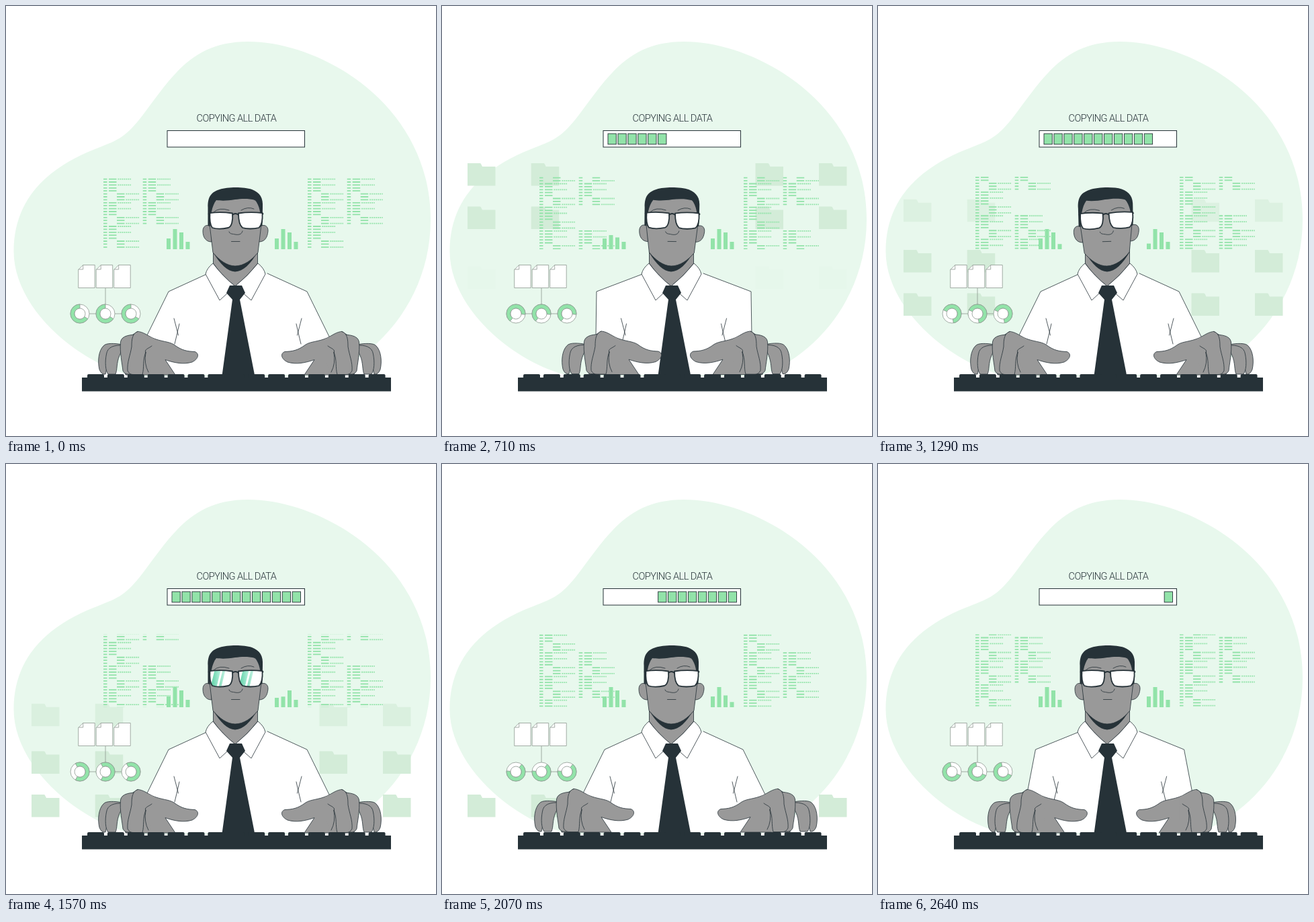
These frames come from a looping animation (640 by 640 pixels, 2710 ms). An HTML page:

```html
<!DOCTYPE html>
<html lang="en">
<head>
<meta charset="utf-8">
<title>Copying all data</title>
<style>
  html, body { margin: 0; width: 100%; height: 100%; overflow: hidden; background: #fff; }
  svg { display: block; width: 100vw; height: 100vh; }
  .ink { fill: #263238; }
  .line { fill: none; stroke: #263238; stroke-width: .8; stroke-linecap: round; stroke-linejoin: round; }
  .skin { fill: #999; stroke: #263238; stroke-width: .8; stroke-linejoin: round; }
  .cloth { fill: #fff; stroke: #263238; stroke-width: .8; stroke-linejoin: round; }
  .green { fill: #92e3a9; }
  .code { fill: none; stroke: #92e3a9; stroke-width: 1.8; }
  .dots { stroke-dasharray: 1.9 1.1; }
  .thin { fill: #fff; stroke: #8d9991; stroke-width: .8; }
  .block { fill: #92e3a9; stroke: #263238; stroke-width: .9; }
  .title { font-family: Roboto, "Open Sans", sans-serif; font-weight: 300; font-stretch: 75%;
    letter-spacing: -.04em; text-anchor: middle; fill: #263238; }
</style>
</head>
<body>
<svg viewBox="0 0 640 640">
  <defs>
    <clipPath id="screen"><rect x="140" y="253.5" width="430" height="108.5"/></clipPath>
    <path id="lensL" d="M303.5 308Q320 306 337 308.5C338 319 336 328 331 330C322 332 313 332 307 330C303 325 303 316 303.5 308Z"/>
    <path id="lensR" d="M346 308.5Q363 306 381.5 308C382 316 381 326 376.5 330C369 332 358 332 352 330C347 326 346 318 346 308.5Z"/>
    <clipPath id="lenses"><use href="#lensL"/><use href="#lensR"/></clipPath>
    <linearGradient id="sheen"><stop stop-color="#55cda0"/><stop offset="1" stop-color="#b9f2df"/></linearGradient>
    <g id="shine" fill="url(#sheen)">
      <path d="M322 305H331L324 334H315Z"/>
      <path d="M334 305H338L331 334H327Z" opacity=".75"/>
    </g>
    <path id="folder" fill="#d3ecd8" d="M0 0H18.5Q20 0 20.5 2L22 5H41.5V33.5H0Z"/>
    <g id="sleeve">
      <path class="sleeveFill" fill="#fff"/>
      <path class="sleeveLine line"/>
      <path class="fold line" d="M250 465L256.5 490M258 473Q255 487 251 503"/>
    </g>
    <g id="hand">
      <path class="skin" d="M174 504C162 502 149 501 145 506C138 513 136 528 139 541Q142 549 148 548L152 530L162 516Z"/>
      <path class="skin" d="M176 505C160 504 151 508 149.5 518C147 530 148 543 152 548H163C166 541 164 532 169 520Z"/>
      <path class="skin" d="M172 500L178 549H252L237 526.5C250 531 264 534 277 530C287 525 288 517 281 514.5C270 514 262 513 250 504C242 499 232 500 218 494C210 490 204 485 196 484.5Z"/>
      <path class="skin" d="M198 489C186 489 172 490 170.5 500C169 515 173 533 174 543Q177 549 184 548H192L200 510Z"/>
      <path fill="#999" d="M197 485C188 486 187 496 187 507C185 520 180 530 181 543Q184 549 190 548.5H206L222 530V496Z"/>
      <path class="line" d="M196 484.5C188 487 187 496 187 507C185 520 180 530 181 543Q184 549 190 548.5H203C206 538 203 528 208 515M208 516C205 511 212 510 217 506M208 516Q205 532 212 545"/>
    </g>
  </defs>

  <rect width="640" height="640" fill="#fff"/>
  <path fill="#e8f8ed" d="M360 53C472 53 632 149 632 318C632 430 560 520 470 552H200C118 540 11.5 455 11.5 365C11.5 285 65 240 130 214C165 200 175 198 200 167C245 108 275 53 360 53Z"/>
  <g id="folders"></g>
  <g clip-path="url(#screen)"><g id="code"></g></g>
  <g id="charts" class="green"></g>
  <path class="thin" d="M148 419.5V444M124 458H172"/>
  <g id="docs"></g>
  <g id="rings"></g>

  <text class="title" x="343" y="175" font-size="22.5">COPYING ALL DATA</text>
  <rect x="240" y="185.5" width="204.5" height="24.5" fill="#fff" stroke="#263238"/>
  <g id="bar"></g>

  <use href="#sleeve"/>
  <use href="#sleeve" transform="translate(690 0) scale(-1 1)"/>
  <path class="skin" d="M308.500 355V383Q322 402 341 417Q360 402 374.500 383V355Z"/>
  <path class="ink" d="M309 368C319 384 329 395 341 395.5C353 395 364 384 374 367V350H309Z"/>
  <path class="cloth" d="M308 383Q299 390 297 399L318 438L341 417Q322 402 308 383Z"/>
  <path class="cloth" d="M375 383Q384 390 386 399L365 438L341 417Q360 402 375 383Z"/>
  <path class="ink" d="M333 416H351L356 427L348 437L371 554H321L337 437L328 427Z"/>

  <g id="head">
    <path class="skin" d="M305 328C298 324 293 328 293 335C293 345 298 351 306 351Z"/>
    <path class="skin" d="M378 328C385 324 390.5 328 390 335C389 345 385 351 376 351Z"/>
    <path class="skin" d="M303 300V325L308 367C317 378 329 387 341 387C354 387 366 378 375 367L380 325V300Q370 280 340 280Q312 280 303 300Z"/>
    <path class="ink" d="M300.5 327V300C300 283 306 277 318 273C330 269 354 269 366 273C378 278 383 285 382 300L381.5 327L379 328C380 308 377 297 371 289C360 286 350 287 341 288C330 290 320 290 313 289C306 298 304.5 312 303.5 328Z"/>
    <path class="line" d="M309 307Q317 299 332 304M350 304Q360 298 369 302"/>
    <g fill="#fff"><use href="#lensL"/><use href="#lensR"/></g>
    <g clip-path="url(#lenses)"><g id="shines"><use href="#shine"/><use href="#shine" x="42"/></g></g>
    <g fill="none" stroke="#263238" stroke-width="1.8">
      <use href="#lensL"/><use href="#lensR"/>
      <path d="M337 311Q341.5 307 346 311M301 310L304 308M381 308L383 310"/>
    </g>
    <path class="line" d="M332 336C333 340 338 339 341 340C346 341 351 340 352 335M335.5 350.5H348"/>
  </g>

  <g class="arm"><use href="#hand"/></g>
  <g transform="translate(696 0) scale(-1 1)"><g class="arm"><use href="#hand"/></g></g>
  <g class="ink" id="keys"><path d="M113 553H573V573.5H113Z"/></g>
</svg>
<script>
const LOOP = 2710, STEP = 1000 / 14;
const $ = s => document.querySelector(s);
const $$ = s => [...document.querySelectorAll(s)];
const range = n => [...Array(n).keys()];
const clamp = v => Math.min(1, Math.max(0, v));
const cubic = p => p < .5 ? 4 * p ** 3 : 1 - 4 * (1 - p) ** 3;
const smooth = p => p * p * (3 - 2 * p);

function add(parent, tag, attrs) {
  const el = document.createElementNS('http://www.w3.org/2000/svg', tag);
  for (const k in attrs) el.setAttribute(k, attrs[k]);
  return parent.appendChild(el);
}

// Eased value from [step, value] pairs
function track(keys, n) {
  let [a, v] = keys[0];
  for (const [b, w] of keys) {
    if (n < b) return v + (w - v) * smooth(clamp((n - a) / (b - a)));
    [a, v] = [b, w];
  }
  return v;
}

// Code columns: eight-row rhythm, 24 rows per cycle
const PITCH = 4.4, CYCLE = 24 * PITCH;
function column(x, rows) {
  let bars = '', dots = '';
  for (const base of [0, CYCLE]) for (const i of range(rows)) {
    const r = i % 8, y = 257.6 + base + i * PITCH, tx = x + (r > 4 ? 20 : 8);
    bars += `M${x} ${y}h5.5M${tx} ${y}h11.5`;
    if ([0, 2, 5, 7].includes(r)) dots += `M${tx + 13.5} ${y}h19.5`;
  }
  add($('#code'), 'path', { class: 'code', d: bars });
  add($('#code'), 'path', { class: 'code dots', d: dots });
}
for (const x of [145, 449]) { column(x, 24); column(x + 58.7, 16); }

const slots = range(5).map(() => {
  const g = add($('#folders'), 'g', {});
  for (const x of [38, 132.7, 466.5, 561]) add(g, 'use', { href: '#folder', x });
  return g;
});

const charts = [[239, 4], [400, 19]].flatMap(([x, start]) =>
  [16, 30, 25, 11].map((h, i) => ({
    h, mid: start + 4 * i,
    el: add($('#charts'), 'rect', { x: x + 9.5 * i, width: 6 })
  })));

for (const x of [107.7, 134.2, 160.7]) add($('#docs'), 'path', {
  class: 'thin', d: `M${x + 7} 385.5h17.5v34h-24.5v-27zv6.5h-7`
});

const rings = [110, 148, 186].map(x => {
  add($('#rings'), 'circle', { class: 'thin', cx: x, cy: 458, r: 14 });
  const g = add($('#rings'), 'g', {});
  const a = 123 * Math.PI / 180, s = Math.sin(a), c = -Math.cos(a);
  add(g, 'path', {
    class: 'thin', style: 'fill:#92e3a9',
    d: `M${14 * s} ${14 * c}A14 14 0 1 1 0 -14V-8A8 8 0 1 0 ${8 * s} ${8 * c}Z`
  });
  add($('#rings'), 'circle', { class: 'thin', cx: x, cy: 458, r: 8 });
  return { x, g };
});

const blocks = range(13).map(i => add($('#bar'), 'rect', {
  class: 'block', x: 247 + 14.93 * i, y: 190, width: 12.3, height: 15.8
}));

for (const i of range(15)) add($('#keys'), 'path', {
  d: `M${121 + 29.9 * i} 554v-4q0 -2 2 -2h21q2 0 2 2v4z`
});

// Keep the heading inside its place whichever font width is available
function fitTitle() {
  const title = $('.title'), w = title.getComputedTextLength();
  if (w <= 121) return;
  const size = 22.5 * 119 / w;
  title.setAttribute('font-size', size);
  title.setAttribute('y', 167 + size * .356);
}
fitTitle();

const reach = [[1, 0], [4, 1], [14.5, 1], [17.5, 0], [30, 0], [33.5, 1], [36.3, 1], [38, 0]];
const tilt = [[8, 0], [12, 1.4], [14.5, 1.4], [17.8, -1.6], [19, -1.6], [22, 0]];

function draw(n) {
  $('#code').setAttribute('transform', `translate(0 ${-2.83 * n})`);

  slots.forEach((g, k) => {
    const start = 4.25 * k;
    const enter = clamp((n - 1 - start) / 3), leave = clamp((n - 12.3 - start) / 3);
    const y = 234 + 64.5 * k + 25 * (1 - cubic(enter)) - 24 * cubic(leave);
    g.setAttribute('transform', `translate(0 ${y})`);
    g.setAttribute('opacity', smooth(enter) * (1 - smooth(leave)));
  });

  for (const { el, h, mid } of charts) {
    const size = h * (1 - .65 * clamp(1 - Math.abs(n - mid) / 3.7));
    el.setAttribute('y', 362 - size);
    el.setAttribute('height', size);
  }

  for (const { x, g } of rings)
    g.setAttribute('transform', `translate(${x} 458) rotate(${n * 360 / 38})`);

  const first = Math.floor(.8 * (n - 22) + 1e-6), last = Math.floor(.625 * n);
  blocks.forEach((b, i) => b.setAttribute('visibility', i >= first && i < last ? 'visible' : 'hidden'));

  const k = track(reach, n);
  const sx = 242 - 12 * k, ex = 209 + 20 * k;
  $('.sleeveFill').setAttribute('d', `M352 398H301L${sx} 425L${ex} 492L${225 + 41 * k} 549H352Z`);
  $('.sleeveLine').setAttribute('d', `M301 398L${sx} 425L${ex} 492`);
  $('.fold').setAttribute('transform', `translate(${16.5 * k} 0)`);
  const lift = Math.max(0, Math.cos((n - 6) * 2 * Math.PI / 23));
  for (const a of $$('.arm')) a.setAttribute('transform', `translate(${41 * k} ${-lift})`);

  $('#head').setAttribute('transform', `rotate(${track(tilt, n)} 342 395)`);
  // Two glints; each is hidden before it can reach the other lens
  const sweep = n < 14 ? 9 * (n - 6) : 9 * (n - 22) - 11;
  $('#shines').setAttribute('transform', `translate(${sweep} 0)`);
  $('#shines').setAttribute('visibility', Math.abs(sweep) < 34 ? 'visible' : 'hidden');
}

const t0 = performance.now();
function tick() {
  const t = (performance.now() - t0) % LOOP;
  draw(Math.min(37, Math.floor((t + 4.9) / STEP)));
  requestAnimationFrame(tick);
}
tick();
</script>
</body>
</html>
```
